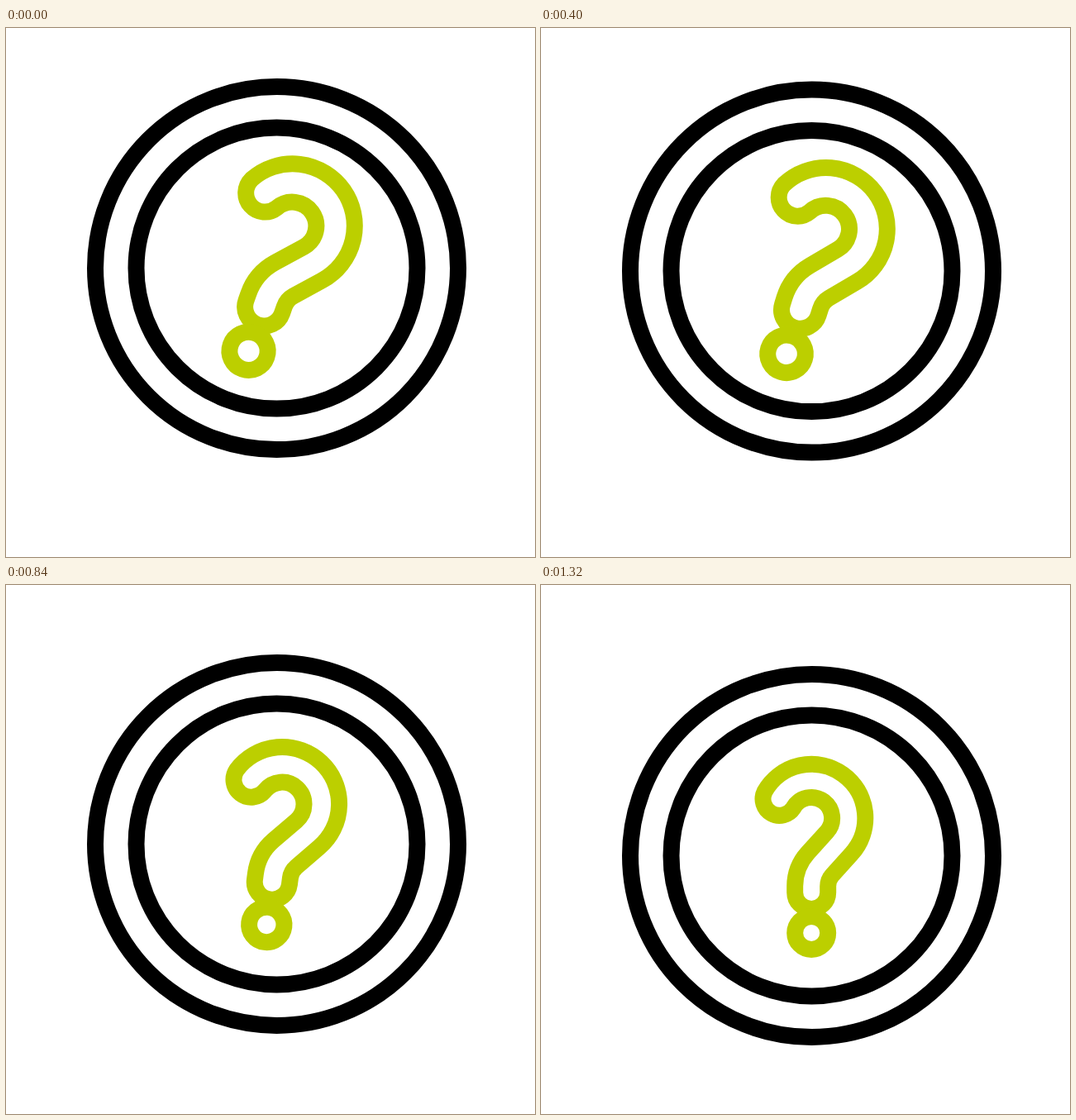
Write an HTML page that moves like this. It is 640 by 640 pixels and loops after 1.34 s.

```html
<!DOCTYPE html>
<html lang="en">
<head>
<meta charset="utf-8">
<title>Question coin</title>
<style>
  html, body { margin: 0; width: 100%; height: 100%; overflow: hidden; background: #fff; }
  svg { display: block; width: 100%; height: 100%; }
</style>
</head>
<body>
<svg viewBox="0 0 640 640" fill="none">
  <g id="coin" stroke="#000" stroke-width="20">
    <circle r="219.5"/>
    <circle r="170"/>
  </g>
  <g id="mark" stroke="#bccf00" stroke-linejoin="round">
    <path d="M-56.6 -77.4 A65 65 0 1 1 48.3 -2 L25.1 23.7 A20 20 0 0 0 20 37.1
      V44.5 A20 20 0 0 1 -20 44.5 V37.1 A60 60 0 0 1 -4.6 -3.1 L18.6 -28.8
      A25 25 0 1 0 -21.8 -57.8 A20 20 0 0 1 -56.6 -77.4 Z"/>
    <circle cy="93.5" r="20"/>
  </g>
</svg>
<script>
  const LOOP = 1340, STEP = 20;
  const TURN = 400 / 3, FALL = 1200;   // top of the bounce, time to sink
  const coin = document.getElementById('coin');
  const mark = document.getElementById('mark');

  // Smooth ease, mirrored before the turning point
  function ease(t) {
    const u = Math.min(1, Math.abs(t - TURN) / FALL);
    return u * u * (3 - 2 * u);
  }

  function draw(ms) {
    const t = Math.floor((ms % LOOP) / STEP) * STEP;
    const p = ease(t), lift = 1 - p;
    const y = 289.3 + 38.2 * p;
    const scale = 1 + 0.16 * lift;
    coin.setAttribute('transform', `translate(327.5 ${y})`);
    mark.setAttribute('transform',
      `translate(${327.2 + 2.1 * lift} ${y - 0.1 - 1.6 * lift}) rotate(${20 * lift}) scale(${scale})`);
    mark.setAttribute('stroke-width', 20 / scale);
  }

  const start = performance.now();
  function tick() {
    draw(performance.now() - start);
    requestAnimationFrame(tick);
  }
  tick();
</script>
</body>
</html>
```
